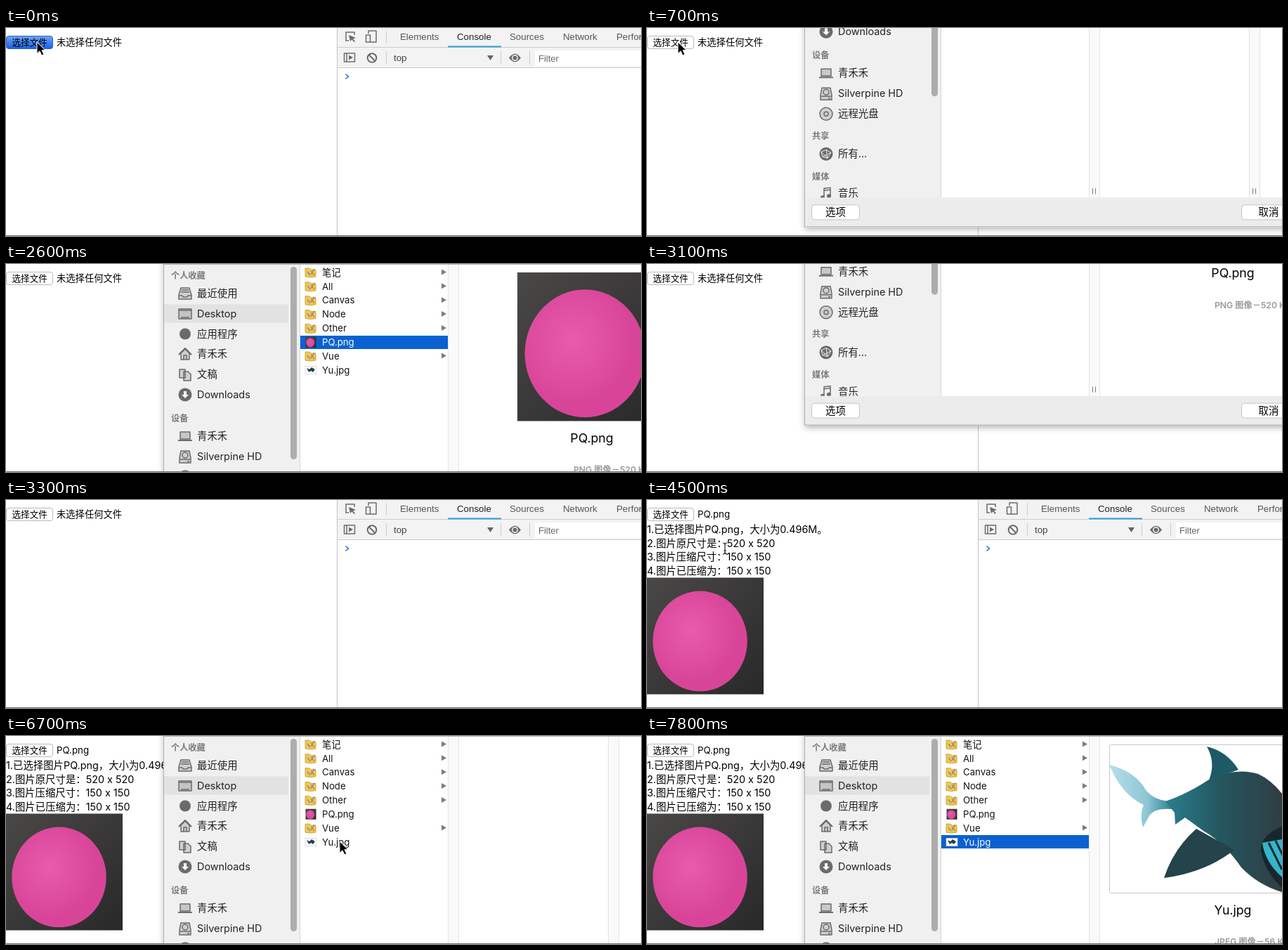
Animation of 904 by 296 pixels, one loop 8000 ms. Source, as an HTML page:

```html
<!DOCTYPE html>
<html lang="zh">
<head>
<meta charset="utf-8">
<title>选择文件</title>
<style>
  html, body { margin: 0; width: 100%; height: 100%; overflow: hidden; background: #fff; }
  svg { display: block; width: 100vw; height: 100vh; }
  text { font-family: Inter, "Noto Sans CJK SC", "Noto Sans CJK", sans-serif; white-space: pre; }
  .dev text { font-family: "Liberation Sans", Arial, sans-serif; }
  .icon { fill: none; stroke: #6b6b6b; stroke-width: 1.5; stroke-linejoin: round; }
  .icon .solid { fill: #6b6b6b; stroke: none; }
  .icon .pale { fill: #cfcfcf; }
</style>
</head>
<body>
<svg id="stage" viewBox="0 0 904 296"></svg>
<script>
const LOOP = 8000, SHEET_HEIGHT = 464, ROW_STEP = 19.85;
const stage = document.getElementById('stage');

const text = (x, y, s, size = 14, attrs = '') =>
  `<text x="${x}" y="${y}" font-size="${size}" ${attrs}>${s}</text>`;
const rect = (x, y, w, h, fill, attrs = '') =>
  `<rect x="${x}" y="${y}" width="${w}" height="${h}" fill="${fill}" ${attrs}/>`;
const path = (d, attrs = '') => `<path d="${d}" ${attrs}/>`;
const group = (content, attrs = '') => `<g ${attrs}>${content}</g>`;
const at = (x, y, content) => group(content, `transform="translate(${x} ${y})"`);

// Pictures
const pinkPhoto = (x, y, size) => group(
  rect(0, 0, 1, 1, 'url(#desk)') +
  '<ellipse cx=".455" cy=".545" rx=".405" ry=".43" fill="url(#pink)"/>',
  `transform="translate(${x} ${y}) scale(${size})"`);

const shark =
  path('M658 41Q695 50 711 78Q722 91 742 93L748 104Q724 102 716 112L706 130Q701 112 707 98Q676 84 658 41Z', 'fill="url(#tail)"') +
  path('M797 15Q826 22 842 48L800 63Q810 38 797 15Z', 'fill="#1d5a66"') +
  path('M738 93Q770 82 800 62Q838 44 870 54Q892 64 910 90V224Q872 214 846 187Q822 152 792 135L766 116 752 126 751 109Z', 'fill="url(#skin)"') +
  path('M782 132Q750 160 736 202Q796 194 836 162Z', 'fill="#24434b"') +
  path('M910 126Q872 140 874 164Q880 196 910 222Z', 'fill="#17272d"') +
  path('M910 146L876 152Q880 182 910 206Z', 'fill="#35b4cb"') +
  path('M885 152L904 190M895 149L910 180', 'stroke="#17272d" stroke-width="3"');

const folder = path('M-8-6H-2L0-4H7V6Q0 8-8 6Z', 'fill="#f2c84b" stroke="#c9962a" stroke-width=".8"') +
  path('M-5-1L-1 4M5-5L0 3', 'stroke="#5f8fc4" stroke-width="1.4"') +
  path('M0-2L5 4', 'stroke="#d9773b" stroke-width="1.4"');
const blueFolder = path('M-8-6H-2L0-4H8V6H-8Z', 'fill="#6fc3ee"');
const sharkIcon = rect(-8, -5.5, 16, 11, '#fff', 'stroke="#ccc" stroke-width=".7"') +
  path('M-6-3L-2-1 1-4 6-1 3 3 0 1-3 3Z', 'fill="#24424c"');

const glyphs = {
  tray: path('M-6-8H6L9 2V8H-9V2Z', 'class="pale"') + path('M-5-5H5M-6-2H6M-9 3H-4L-3 5H3L4 3H9'),
  desktop: rect(-9, -7, 18, 14, '#c4c4c4') + path('M-9-5H9M-6 5H6'),
  apps: '<circle class="solid" r="8"/>',
  home: path('M-6-1V8H6V-1L0-7Z', 'class="pale"') + path('M-9 1L0-8 9 1', 'stroke-width="2"') + path('M-2 8V2H2V8'),
  docs: path('M-8-7H0V5H-8ZM-2-4H4L8 0V9H-2Z', 'class="pale"'),
  download: '<circle class="solid" r="9.5"/>' +
    path('M-2-5H2V0H5L0 5-5 0H-2Z', 'fill="#fff" stroke="none"'),
  laptop: rect(-7, -6, 14, 10, '#c8c8c8') + path('M-10 6H10', 'stroke-width="2"'),
  disk: path('M-6-8H6L8 2V9H-8V2Z', 'class="pale"') + '<circle cy="-2" r="4"/>' + path('M-7 4H7M3 7H6'),
  disc: '<circle class="pale" r="9"/><circle r="3"/>',
  globe: '<circle class="solid" r="9.5"/>' +
    path('M-7-3L0-6 7-2 2 6-5 4ZM-7-3L2 6M0-6L2 6M-5 4L7-2', 'stroke="#eee" stroke-width="1"'),
  music: path('M-3 6V-7L6-8V4M-3-4L6-5') + '<circle class="solid" cx="-5" cy="6" r="3"/><circle class="solid" cx="4" cy="4" r="3"/>'
};

// Page
const page =
  rect(.5, 11.5, 66, 18, '#fff', 'id="button" rx="3.5" stroke="#b9b9b9"') +
  text(8.5, 25, '选择文件', 12.6) +
  text(72, 25, '', 13.3, 'id="filename"') +
  group([
    '1.已选择图片PQ.png，大小为0.496M。',
    '2.图片原尺寸是：520 x 520',
    '3.图片压缩尺寸：150 x 150',
    '4.图片已压缩为：150 x 150'
  ].map((s, i) => text(0, 46.8 + i * 19.8, s, 14.4)).join(''), 'id="report"') +
  group(pinkPhoto(0, 110.5, 166), 'id="result"');

// Developer tools
const tabs = [[561, 'Elements'], [642, 'Console'], [717, 'Sources'], [793, 'Network'], [869, 'Performance']];
const devtools =
  rect(471, 0, 433, 296, '#fff') + rect(472, 0, 432, 57, '#f3f3f3') +
  rect(472, 27, 432, 1, '#cdcdcd') + rect(472, 56, 432, 1, '#cdcdcd') +
  rect(471, 0, 1, 296, '#c4c4c4') +
  tabs.map(([x, s]) => text(x, 17, s, 13.3, `fill="${s === 'Console' ? '#222' : '#555'}"`)).join('') +
  rect(629, 25.5, 76, 2, '#2a9fd8') +
  [[541, 4], [541, 33], [704, 33], [745, 33]].map(([x, y]) => rect(x, y, 1, 18, '#ccc')).join('') +
  group(
    path('M488 18H484V6H496V10') + path('M488 10L498 14 494 15.5 497 19 495.5 20 492.5 16.5 490 19Z', 'class="solid"') +
    path('M516 8V4H527V20H519') + rect(512.5, 10, 6, 10, 'none') +
    rect(481.5, 36, 15, 12, 'none') + path('M485 36V48') + path('M488 38.5L494 42 488 45.5Z', 'class="solid"') +
    '<circle cx="521" cy="42.5" r="6.3" stroke-width="2"/>' + path('M516.5 38L525.5 47', 'stroke-width="2"') +
    path('M716 42.5Q724.5 31 733 42.5Q724.5 54 716 42.5Z', 'class="solid"') +
    '<circle cx="724.5" cy="42.5" r="3.7" stroke="#f3f3f3"/>', 'class="icon"') +
  text(552, 46.5, 'top', 13.3, 'fill="#444"') + path('M685 39H694L689.5 46Z', 'fill="#666"') +
  rect(753, 32, 151, 22, '#fff') + text(758, 47.5, 'Filter', 13, 'fill="#666"') +
  path('M483.5 65.5L487.5 69 483.5 72.5', 'fill="none" stroke="#2f6fdb" stroke-width="1.6"');

// File sheet
const heading = (y, s) => text(235, y + 4.5, s, 12.2, 'font-weight="600" fill="#7b7b7b"');
const places = [
  [42, '最近使用', 'tray'], [71, 'Desktop', 'desktop'], [99.5, '应用程序', 'apps'],
  [128, '青禾禾', 'home'], [157, '文稿', 'docs'], [186, 'Downloads', 'download'],
  [245, '青禾禾', 'laptop'], [274, 'Silverpine HD', 'disk'], [303, '远程光盘', 'disc'],
  [360, '所有...', 'globe'], [416, '音乐', 'music']
];
const files = ['笔记', 'All', 'Canvas', 'Node', 'Other', 'PQ.png', 'Vue', 'Yu.jpg'];
const rowY = i => 12 + i * ROW_STEP;
const caret = (x, y) => path(`M${x} ${y - 4}L${x + 7} ${y} ${x} ${y + 4}Z`);
const gutter = x => rect(x, 0, 15, 422, '#fafafa') + rect(x, 0, 1, 422, '#e2e2e2') +
  rect(x + 15, 0, 1, 422, '#e2e2e2') + rect(x + 5, 409, 1, 8, '#777') + rect(x + 9, 409, 1, 8, '#777');

const fileRow = (name, i) => {
  const y = rowY(i);
  const icon = name === 'PQ.png' ? pinkPhoto(-7.5, -7.5, 15) : name === 'Yu.jpg' ? sharkIcon : folder;
  return at(434, y, icon) +
    group(text(450, y + 4.7, name, 13.2) + (name.includes('.') ? '' : group(caret(620, y - .5), 'class="caret"')), 'class="row"');
};
const caption = (name, kind) =>
  text(834, 253.5, name, 17.7, 'text-anchor="middle"') +
  text(808, 297, kind, 12.2, 'font-weight="600" fill="#999"');

const sheet =
  rect(225, -30, 700, SHEET_HEIGHT + 30, '#fff', 'filter="url(#shadow)"') +
  rect(225, 0, 193, 422, '#f0f0f0') + rect(225, 57.5, 177, 26, '#e2e2e2') +
  rect(405, 4, 9, 274, '#adadad', 'rx="4.5"') + rect(418, 0, 1, 422, '#d5d5d5') +
  heading(16, '个人收藏') + heading(219.5, '设备') + heading(334, '共享') + heading(392, '媒体') +
  places.map(([y, s, icon]) =>
    at(255, y, group(glyphs[icon], 'class="icon"')) + text(272, y + 5, s, 14.4, 'fill="#222"')).join('') +
  rect(419, 0, 210, 19, '#0a61d1', 'id="selection"') +
  files.map(fileRow).join('') + gutter(629) +
  group(gutter(857), 'id="columns"') +
  group(at(661, 12, blueFolder) + text(677, 16.7, 'day01', 13.2) + group(caret(847, 11.5), 'opacity=".55"'), 'id="vue"') +
  group(pinkPhoto(728, 12, 211.5) + caption('PQ.png', 'PNG 图像－520 KB'), 'id="pink-preview"') +
  group(rect(658.5, 12.5, 352, 211, '#fff', 'rx="2" stroke="#c6c6c6"') + shark +
    caption('Yu.jpg', 'JPEG 图像－56 KB'), 'id="shark-preview"') +
  rect(225, 0, 679, 1, '#b5b5b5') + rect(225, 422, 679, 42, '#ececec') +
  rect(234.5, 432.5, 68, 21, '#fff', 'rx="4" stroke="#c4c4c4"') + text(268.5, 448, '选项', 14.4, 'text-anchor="middle"') +
  rect(846.5, 432.5, 78, 21, '#fff', 'rx="4" stroke="#c4c4c4"') + text(885, 448, '取消', 14.4, 'text-anchor="middle"') +
  rect(225, 463, 679, 1, '#a8a8a8') + rect(224, -30, 1, SHEET_HEIGHT + 30, '#b0b0b0');

stage.innerHTML = `<defs>
  <linearGradient id="desk" x2="1" y2="1"><stop stop-color="#4a4847"/><stop offset="1" stop-color="#292829"/></linearGradient>
  <radialGradient id="pink" cx=".4" cy=".4"><stop stop-color="#e85bad"/><stop offset="1" stop-color="#d84598"/></radialGradient>
  <linearGradient id="blue" x2="0" y2="1"><stop stop-color="#6aa5f8"/><stop offset="1" stop-color="#1c5fe4"/></linearGradient>
  <linearGradient id="tail"><stop stop-color="#b5dfeb"/><stop offset=".6" stop-color="#8fc6d5"/><stop offset="1" stop-color="#2a7f8e"/></linearGradient>
  <linearGradient id="skin"><stop stop-color="#2a7f8e"/><stop offset=".45" stop-color="#245660"/><stop offset="1" stop-color="#303c41"/></linearGradient>
  <filter id="shadow" x="-10%" y="-10%" width="120%" height="120%"><feDropShadow dx="0" dy="3" stdDeviation="5" flood-opacity=".3"/></filter>
</defs>` +
  rect(0, 0, 904, 296, '#fff') + page + group(devtools, 'class="dev"') + group(sheet, 'id="sheet"') +
  rect(0, 295, 904, 1, '#6f6f6f') +
  group(path('M0 0V16.5L4 12.8 6.8 19 9.8 17.7 7 11.6H12Z', 'id="arrow" stroke="#fff"') +
    path('M-3-8Q0-8 0-5Q0-8 3-8M0-5V6M-3 8Q0 8 0 5Q0 8 3 8M-2 3H2', 'id="beam" fill="none" stroke="#222" stroke-width="1.2"'), 'id="cursor"');

const el = id => document.getElementById(id);
const rows = [...document.querySelectorAll('.row')];
const show = (id, on) => el(id).setAttribute('display', on ? 'inline' : 'none');
const ease = p => p * p * (3 - 2 * p);
const ramp = (t, start, duration) => ease(Math.min(1, Math.max(0, (t - start) / duration)));

// [time, x, y] stops of the pointer
const route = [
  [0, 44, 20], [950, 44, 20], [1500, 473, 121], [1850, 473, 121], [2400, 870, 310],
  [3500, 870, 310], [4200, 268, 110], [4500, 111, 69], [4800, 75, 245], [5200, 44, 20],
  [6200, 44, 20], [6650, 475, 150], [6850, 475, 150], [7400, 915, 225], [LOOP, 915, 225]
];
function pointer(t) {
  const i = route.findIndex(stop => stop[0] > t);
  const [t0, x0, y0] = route[i - 1], [t1, x1, y1] = route[i];
  const p = ramp(t, t0, t1 - t0);
  return [x0 + (x1 - x0) * p, y0 + (y1 - y0) * p];
}

function selectedFile(t) {
  if (t >= 6800) return 'Yu.jpg';
  if (t >= 3300 || t < 1450) return '';
  return t >= 1900 ? 'PQ.png' : 'Vue';
}

function draw(t) {
  const pressed = t < 200 || (t >= 5350 && t < 5600);
  el('button').setAttribute('fill', pressed ? 'url(#blue)' : '#fff');
  el('button').setAttribute('stroke', pressed ? '#2a62c9' : '#b9b9b9');
  el('filename').textContent = t < 3500 ? '未选择任何文件' : 'PQ.png';
  show('report', t >= 3600);
  show('result', t >= 3800);

  const open = ramp(t, 500, 350) - ramp(t, 2950, 300) + ramp(t, 5884, 350);
  show('sheet', open > 0);
  el('sheet').setAttribute('transform', `translate(0 ${(open - 1) * SHEET_HEIGHT})`);

  const file = selectedFile(t), index = files.indexOf(file);
  show('selection', index >= 0);
  el('selection').setAttribute('y', Math.round(rowY(index) - 9.6));
  rows.forEach((row, i) => {
    row.setAttribute('fill', i === index ? '#fff' : '#111');
    row.querySelector('.caret')?.setAttribute('opacity', i === index ? 1 : .55);
  });
  show('columns', !file.includes('.'));
  show('vue', file === 'Vue');
  show('pink-preview', file === 'PQ.png');
  show('shark-preview', file === 'Yu.jpg');

  const [x, y] = pointer(t);
  const overText = t > 3600 && t < 5200 && x < 245 && y > 33 && y < 110;
  el('cursor').setAttribute('transform', `translate(${x} ${y})`);
  show('arrow', !overText);
  show('beam', overText);
}

const begin = performance.now();
(function tick() {
  draw((performance.now() - begin) % LOOP);
  requestAnimationFrame(tick);
})();
</script>
</body>
</html>
```
